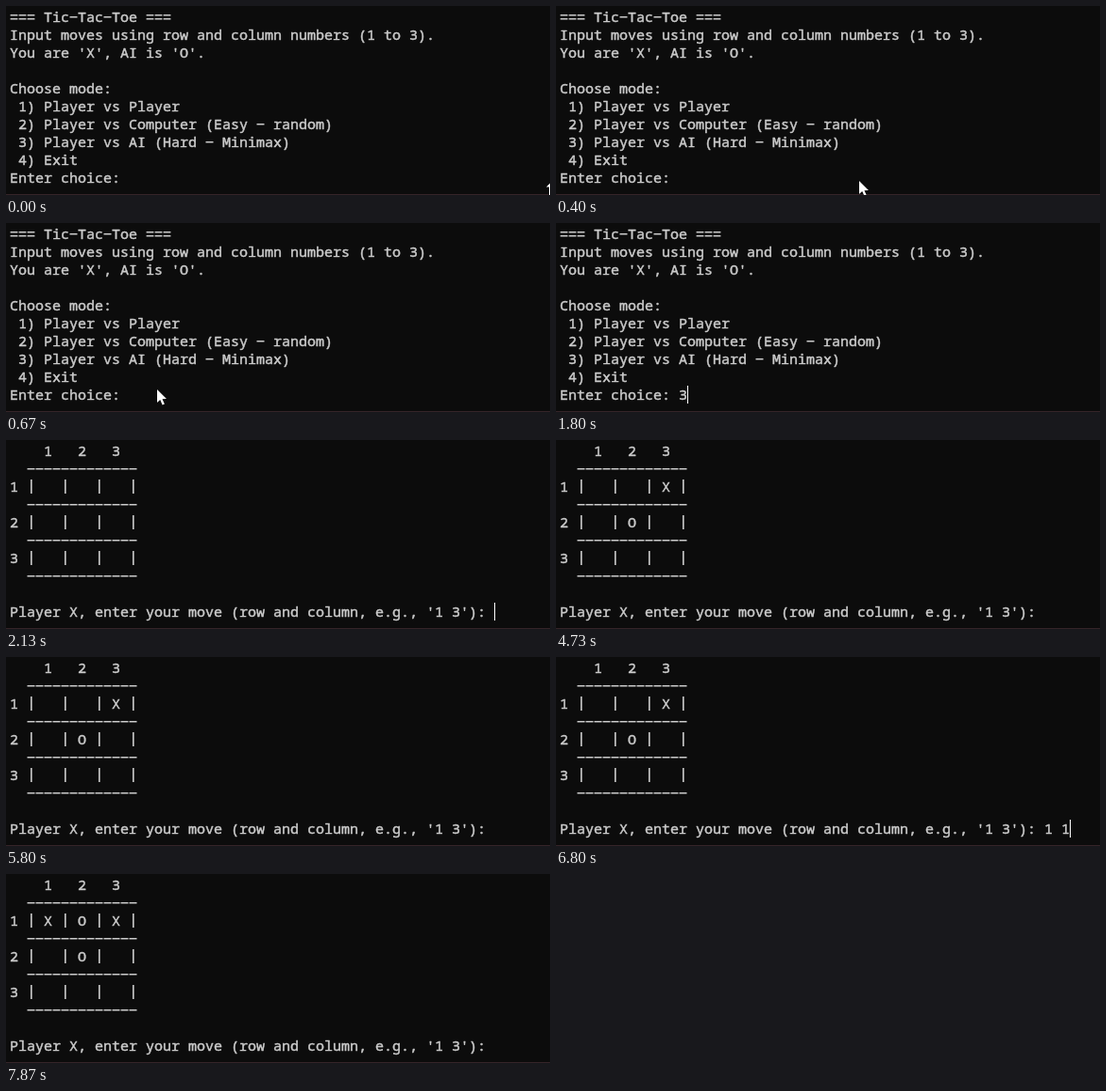
Recreate the animation shown at these times as an HTML page with a canvas. Size 576x201 px, loop 8 s.

```html
<!DOCTYPE html>
<html lang="en">
<head>
<meta charset="utf-8">
<title>Tic-Tac-Toe in a terminal</title>
<style>
html, body { margin: 0; width: 100%; height: 100%; overflow: hidden; background: #0c0c0c; }
canvas { display: block; }
</style>
</head>
<body>
<canvas id="stage" width="576" height="201"></canvas>
<script>
const ctx = document.getElementById('stage').getContext('2d');
const LOOP = 8000, LEFT = 4, TOP = 2, CELL = 9, LINE = 19;
const INK = '#cccccc';

const MENU = [
  '=== Tic-Tac-Toe ===',
  'Input moves using row and column numbers (1 to 3).',
  "You are 'X', AI is 'O'.",
  '',
  'Choose mode:',
  ' 1) Player vs Player',
  ' 2) Player vs Computer (Easy - random)',
  ' 3) Player vs AI (Hard - Minimax)',
  ' 4) Exit'
];
const CHOICE = 'Enter choice: ';
const MOVE = "Player X, enter your move (row and column, e.g., '1 3'): ";

// Each state: start time, board (null shows the menu), typed input, caret on
const EMPTY = '         ', FIRST = '  X O    ', SECOND = 'XOX O    ';
const STATES = [
  [0, null, '', 0], [930, null, '', 1], [1470, null, '', 0], [1800, null, '3', 1],
  [2130, EMPTY, '', 1], [2730, EMPTY, '', 0], [3070, EMPTY, '', 1],
  [3130, EMPTY, '1', 1], [3470, EMPTY, '1 ', 1], [3730, EMPTY, '1 3', 1],
  [4070, FIRST, '', 1], [4730, FIRST, '', 0], [5270, FIRST, '', 1], [5800, FIRST, '', 0],
  [6270, FIRST, '1', 1], [6530, FIRST, '1 ', 1], [6800, FIRST, '1 1', 1],
  [7270, SECOND, '', 1], [7870, SECOND, '', 0]
];

function boardLines(board) {
  const rule = '  ' + '-'.repeat(13);
  const lines = ['    1   2   3', rule];
  for (let r = 0; r < 3; r++) {
    const marks = [...board.slice(r * 3, r * 3 + 3)];
    lines.push(`${r + 1} | ${marks.join(' | ')} |`, rule);
  }
  return lines.concat('');
}

// Glyphs that fill the cell: x, y, width, height within it
const BARS = {
  '-': [[0.5, 9, 8, 1.5]],
  '=': [[0.6, 7, 7.8, 1.5], [0.6, 11, 7.8, 1.5]],
  '|': [[4, 2, 1.6, 15]]
};

function drawLine(text, row) {
  const y = TOP + row * LINE;
  const letters = text.replace(/[-=|]/g, ' ');
  ctx.fillStyle = ctx.strokeStyle = INK;
  ctx.lineWidth = 0.45;
  ctx.fillText(letters, LEFT, y + 15);
  ctx.strokeText(letters, LEFT, y + 15);
  [...text].forEach((ch, col) => {
    for (const [bx, by, w, h] of BARS[ch] || []) {
      ctx.fillRect(LEFT + col * CELL + bx, y + by, w, h);
    }
  });
}

function drawShape(points, x, y) {
  ctx.fillStyle = '#ffffff';
  ctx.strokeStyle = '#000000';
  ctx.lineWidth = 1;
  ctx.beginPath();
  for (const [px, py] of points) ctx.lineTo(x + px, y + py);
  ctx.closePath();
  ctx.stroke();
  ctx.fill();
}

const ARROW = [[0, 0], [0, 14], [3.2, 11], [5.6, 16.4], [7.9, 15.4], [5.5, 10.2], [10, 10]];
// Left half of the vertical resize pointer, cut by the stage edge
const RESIZE = [[0, 5.5], [4.5, 1], [4.5, 14], [3, 14], [3, 5.5]];

function drawPointer(t) {
  if (t >= 1800) return;
  if (t < 200) return drawShape(RESIZE, 572, 187);
  const step = Math.min(8, 1 + Math.floor((t - 200) / 67.1));
  const left = 1 - step / 8;
  drawShape(ARROW, Math.round(160 + 412 * left * left), Math.round(177 + 14 * left));
}

function draw(t) {
  const [, board, typed, caret] = STATES.filter(s => s[0] <= t).pop();
  const lines = board ? boardLines(board) : MENU;
  const input = (board ? MOVE : CHOICE) + typed;

  ctx.fillStyle = '#0c0c0c';
  ctx.fillRect(0, 0, 576, 201);
  ctx.fillStyle = '#352428';
  ctx.fillRect(0, 200, 576, 1);

  ctx.font = '15px "Noto Sans Mono", "DejaVu Sans Mono", monospace';
  ctx.lineJoin = 'round';
  lines.concat(input).forEach(drawLine);
  if (caret) {
    ctx.fillStyle = '#ffffff';
    ctx.fillRect(LEFT + input.length * CELL, TOP + 9 * LINE, 1, LINE);
  }
  drawPointer(t);
}

const start = performance.now();
function tick() {
  draw((performance.now() - start) % LOOP);
  requestAnimationFrame(tick);
}
tick();
</script>
</body>
</html>
```
